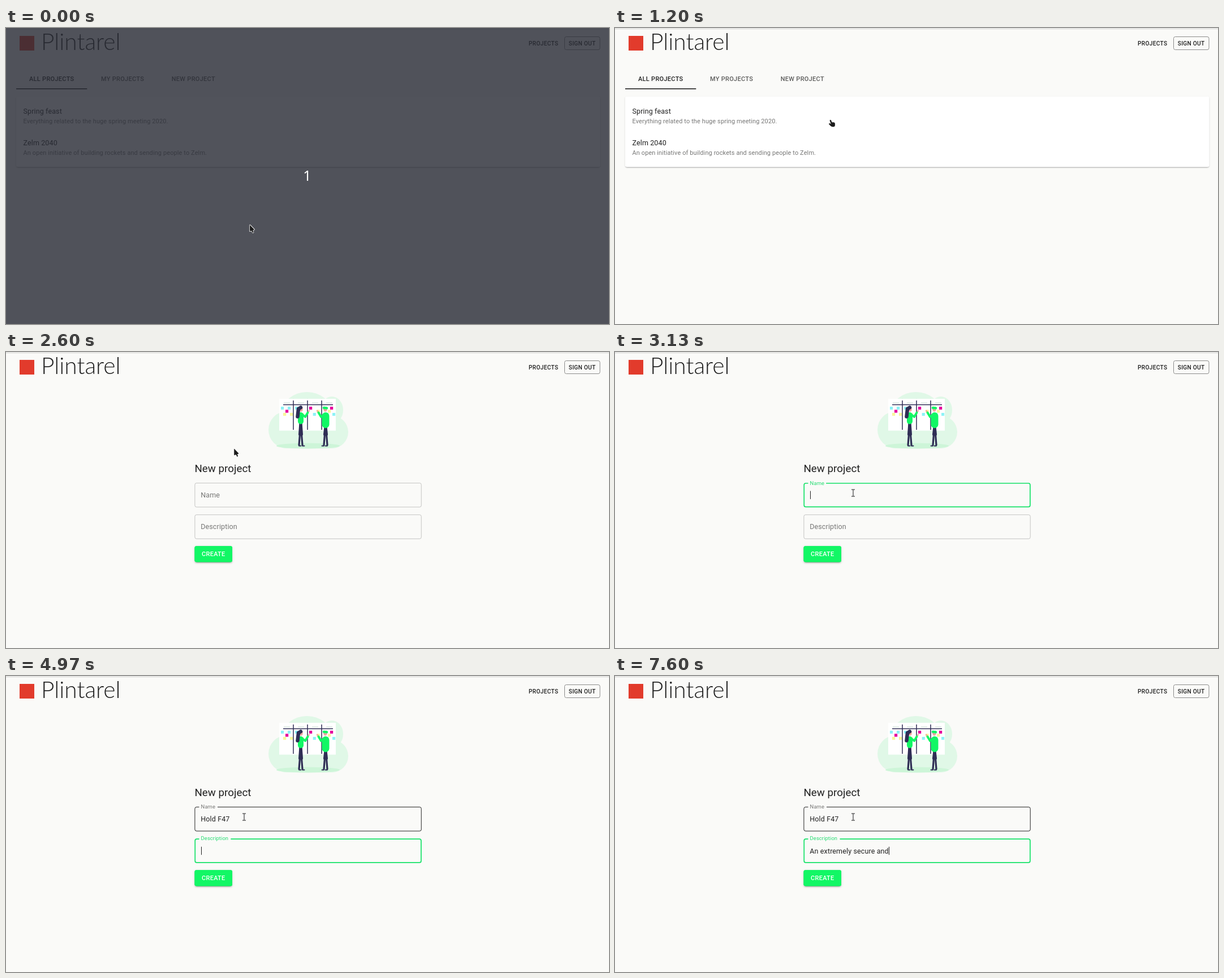
Animation of 1066x525 px, one loop 8 s. Source, as an HTML page with a canvas:

```html
<!DOCTYPE html>
<html lang="en">
<head>
<meta charset="utf-8">
<title>New project demo</title>
<style>
html, body { margin: 0; width: 100%; height: 100%; overflow: hidden; background: #fafaf8; }
canvas { display: block; }
</style>
</head>
<body>
<canvas id="stage" width="1066" height="525"></canvas>
<script>
const ctx = document.getElementById('stage').getContext('2d');
const LOOP = 8000, ZOOM = 0.783;
const INK = '#212121', MUTED = '#777776', GREEN = '#14e267', BG = '#fafaf8';
const NAVY = '#2f2e55', LIME = '#12f765', SKIN = '#f2a6a0';
const NOTE_COLORS = ['#8df3f6', '#f8f79a', '#e5009d'];

const OPEN_FORM = 2100, LEAVE_TAB = 2530, FOCUS_NAME = 2990, FOCUS_DESC = 4800;

// Bursts of typing: keys are spread evenly from first to last
const NAME = [['Hold', 3330, 3770], [' F', 3970, 4130], ['47', 4370, 4430]];
const DESC = [['An e', 5130, 5400], ['xt', 5570, 5730], ['remely', 5870, 6270],
  [' ', 6430, 6430], ['se', 6770, 6830], ['cure and', 7000, 7600]];

// Pointer moves: start, end, number of steps, destination
const MOVES = [
  [1100, 1300, 5, 354, 61],
  [1600, 1800, 4, 345, 89],
  [LEAVE_TAB, 2600, 2, 403, 171],
  [2770, 2930, 4, 421, 250]
];

const clamp = v => Math.max(0, Math.min(1, v));
const mix = (a, b, p) => a + (b - a) * p;
const easeOut = p => 1 - (1 - clamp(p)) ** 3;

function typed(bursts, t) {
  return bursts.map(([str, first, last]) => {
    const gaps = Math.max(1, str.length - 1);
    return [...str].filter((_, i) => first + (last - first) * i / gaps <= t).join('');
  }).join('');
}

function text(str, x, y, { size = 16, weight = 400, color = INK, gap = 0.00938, align = 'left', family = 'Roboto' } = {}) {
  const px = size * ZOOM;
  ctx.font = `${weight} ${px}px ${family}, sans-serif`;
  ctx.letterSpacing = `${px * gap}px`;
  ctx.textAlign = align;
  ctx.fillStyle = color;
  ctx.fillText(str, x, y);
  return ctx.measureText(str).width;
}

const caps = (str, x, y, color = INK, size = 14) =>
  text(str, x, y, { size, weight: 500, color, gap: 0.02857, align: 'center' });

function rect(color, x, y, w, h) {
  ctx.fillStyle = color;
  ctx.fillRect(x, y, w, h);
}

function outline(color, width, x, y, w, h) {
  ctx.strokeStyle = color;
  ctx.lineWidth = width;
  ctx.beginPath();
  ctx.roundRect(x + width / 2, y + width / 2, w - width, h - width, 3);
  ctx.stroke();
}

function ellipse(color, x, y, rx, ry = rx) {
  ctx.fillStyle = color;
  ctx.beginPath();
  ctx.ellipse(x, y, rx, ry, 0, 0, 2 * Math.PI);
  ctx.fill();
}

function line(color, width, ...points) {
  ctx.beginPath();
  for (let i = 0; i < points.length; i += 2) ctx.lineTo(points[i], points[i + 1]);
  ctx.strokeStyle = color;
  ctx.lineWidth = width;
  ctx.stroke();
}

// Raised surface with the usual three stacked shadows
function paper(color, x, y, w, h, lift) {
  const shadows = [[lift + 1, 1, 0.2, lift], [lift, lift, 0.14, 0], [1, 2 * lift + 1, 0.12, 0]];
  ctx.save();
  ctx.fillStyle = color;
  for (const [offset, blur, alpha, inset] of shadows) {
    ctx.shadowColor = `rgba(0,0,0,${alpha})`;
    ctx.shadowBlur = blur;
    ctx.shadowOffsetY = offset;
    ctx.beginPath();
    ctx.roundRect(x + inset, y + inset, w - 2 * inset, h - 2 * inset, 3);
    ctx.fill();
  }
  ctx.restore();
}

function header() {
  rect(BG, 0, 0, 1066, 525);
  rect('#cdcdcc', 0, 1, 1066, 1);
  rect('#e23b2c', 24, 14, 26, 26);
  text('Plintarel', 62, 39, { size: 52, weight: 300, gap: 0, family: 'Lato' });
  caps('PROJECTS', 950.2, 31, INK, 13);
  outline('#8b8b8a', 1, 987, 15, 63.5, 24);
  caps('SIGN OUT', 1018.6, 31, INK, 13);
}

function listPage() {
  ['ALL', 'MY', 'NEW'].forEach((word, i) =>
    caps(word + (i < 2 ? ' PROJECTS' : ' PROJECT'), 80.7 + 125.3 * i, 94, i ? '#5c5c5b' : INK));
  rect(INK, 18, 107, 125.3, 1.6);
  paper('#fff', 18, 121.5, 1032.5, 125, 1);
  const rows = [
    ['Spring feast', 'Everything related to the huge spring meeting 2020.'],
    ['Zelm 2040', 'An open initiative of building rockets and sending people to Zelm.']
  ];
  rows.forEach(([title, about], i) => {
    const y = 151.7 + 56.3 * i;
    text(title, 30.5, y);
    text(about, 30.5, y + 17.3, { size: 14, color: MUTED, gap: 0.01071 });
  });
}

function board() {
  rect('#fff', 483, 83, 100, 56.5);
  [5, 2, 3, 5].forEach((count, column) => {
    const left = 483 + 25 * column;
    rect('#dce9e2', left + 8, 89.5, 11, 1.5);
    if (column) line(NAVY, 1.5, left, 86, left, 138);
    for (let k = 0; k < count; k++) {
      const color = NOTE_COLORS[(k + 2 * (column > 1)) % 3];
      rect(color, left + 3 + 20 * k / count, 97 + 5.5 * (2 * k % 3), 5.2, 5.2);
    }
  });
  line(NAVY, 1.5, 490, 93.5, 578, 93.5);
}

// Standing figure reaching forward; facing is 1 for right and -1 for left
function person(x, facing, girth, hips) {
  ctx.save();
  ctx.translate(x, 0);
  ctx.scale(facing, 1);
  ctx.lineCap = ctx.lineJoin = 'round';
  for (const foot of [-3, 3]) {
    line(NAVY, 5, 0, hips, foot / 2, 146);
    line(NAVY, 3.2, foot / 2, 146, foot, 165);
    line(NAVY, 1.8, foot, 166.5, foot + 3.5, 166.5);
  }
  ellipse(SKIN, 0.5, 101.5, 3.2, 4.2);
  line(SKIN, 2.2, 12, 108, 15, 104);
  line(LIME, 4, 3, 111, 8, 115, 12.5, 107.5);
  line(LIME, girth, 0, 107 + girth / 2, 0, hips - girth / 2 + 3);
  ctx.restore();
}

function illustration() {
  const mint = '#e0f8e7';
  ellipse(mint, 497, 138, 33);
  ellipse(mint, 532, 108, 44, 37);
  ellipse(mint, 576, 103, 20, 24);
  ellipse(mint, 576, 142, 29);
  rect(mint, 497, 100, 79, 71);
  ellipse('#cdf5d8', 534, 166.5, 56, 5);
  board();
  person(521, 1, 10, 125);
  person(565, -1, 13, 132);
  ctx.lineCap = 'round';
  line(NAVY, 6.5, 521, 98.5, 517, 101, 515.5, 114.5);
  line(LIME, 4.5, 562, 99, 567, 99.5);
  ctx.lineCap = 'butt';
}

function field(label, y, { value, since, until = LOOP, hovered, notch }, t) {
  const focused = t >= since && t < until;
  const float = easeOut((t - since) / 200);
  outline(focused ? GREEN : hovered ? INK : '#c4c4c3', focused ? 1.7 : 1, 333.4, y, 401.3, 43.6);
  if (float > 0) rect(BG, 341.5, y - 1, notch * float, 3.2);
  text(label, mix(344.2, 344.6, float), mix(y + 26, y + 3.2, float),
    { size: mix(16, 12, float), color: focused ? '#27dc73' : MUTED });
  const width = value ? text(value, 344.3, y + 26.4) : 0;
  if (focused) rect(INK, Math.round(344.5 + width), y + 14.6, 1, 14.4);
}

function formPage(t, pointer) {
  illustration();
  text('New project', 333.4, 213, { size: 24, gap: 0 });
  field('Name', 231.9, {
    value: typed(NAME, t), since: FOCUS_NAME, until: FOCUS_DESC, notch: 32.5, hovered: pointer.y > 232
  }, t);
  field('Description', 288.2, { value: typed(DESC, t), since: FOCUS_DESC, notch: 56 }, t);
  paper(LIME, 333.5, 344.2, 66.5, 28.2, 2);
  caps('CREATE', 366.8, 362.3, '#fff');
}

function pointerAt(t) {
  let x = 430.5, y = 348.5;
  for (const [start, end, steps, toX, toY] of MOVES) {
    if (t < start) break;
    const beat = (end - start) / (steps - 1);
    const p = clamp((Math.floor((t - start) / beat) + 1) / steps);
    const eased = p * p * (3 - 2 * p);
    x = mix(x, toX, eased);
    y = mix(y, toY, eased);
  }
  return { x, y };
}

function beam(color, grow) {
  line(color, 1 + grow, 0, -5.5, 0, 5.5);
  for (const end of [-6, 6]) line(color, 1 + grow, -3, end, 3, end);
}

function arrow(color, grow) {
  line(color, 2 + grow, 3.5, 8, 6, 13.5);
  line(color, 1 + grow, 0.8, 1.5, 0.8, 11.5, 8, 9, 0.8, 1.5);
  ctx.fillStyle = color;
  ctx.fill();
}

function hand(color, grow) {
  line(color, 2.4 + grow, 0, 2, 2, 7);
  line(color, 2.4 + grow, -1.5, 8, 1.5, 11);
  line(color, 6 + grow, 3.5, 8, 5, 8, 5, 10, 4, 10);
}

function drawPointer({ x, y }, t) {
  const inside = (a, b) => y >= a && y <= b;
  const onLink = t < OPEN_FORM ? inside(72, 108) || inside(133, 239) : t < LEAVE_TAB;
  const shape = t >= OPEN_FORM && y > 232 ? beam : onLink ? hand : arrow;
  ctx.save();
  ctx.translate(x, y);
  if (shape !== beam) ctx.lineCap = ctx.lineJoin = 'round';
  shape('#f4f4f4', 1.6);
  shape('#1c1c1c', 0);
  ctx.restore();
}

function countdown() {
  rect('rgba(41,44,53,.81)', 0, 0, 1066, 525);
  text('1', 532.5, 271, { size: 32, color: '#fff', gap: 0, align: 'center', family: '"Noto Sans"' });
}

function draw(t) {
  const pointer = pointerAt(t);
  header();
  if (t < OPEN_FORM) listPage();
  else formPage(t, pointer);
  if (t < 30) countdown();
  drawPointer(pointer, t);
}

const begin = performance.now();
function tick() {
  draw((performance.now() - begin) % LOOP);
  requestAnimationFrame(tick);
}
tick();
</script>
</body>
</html>
```
